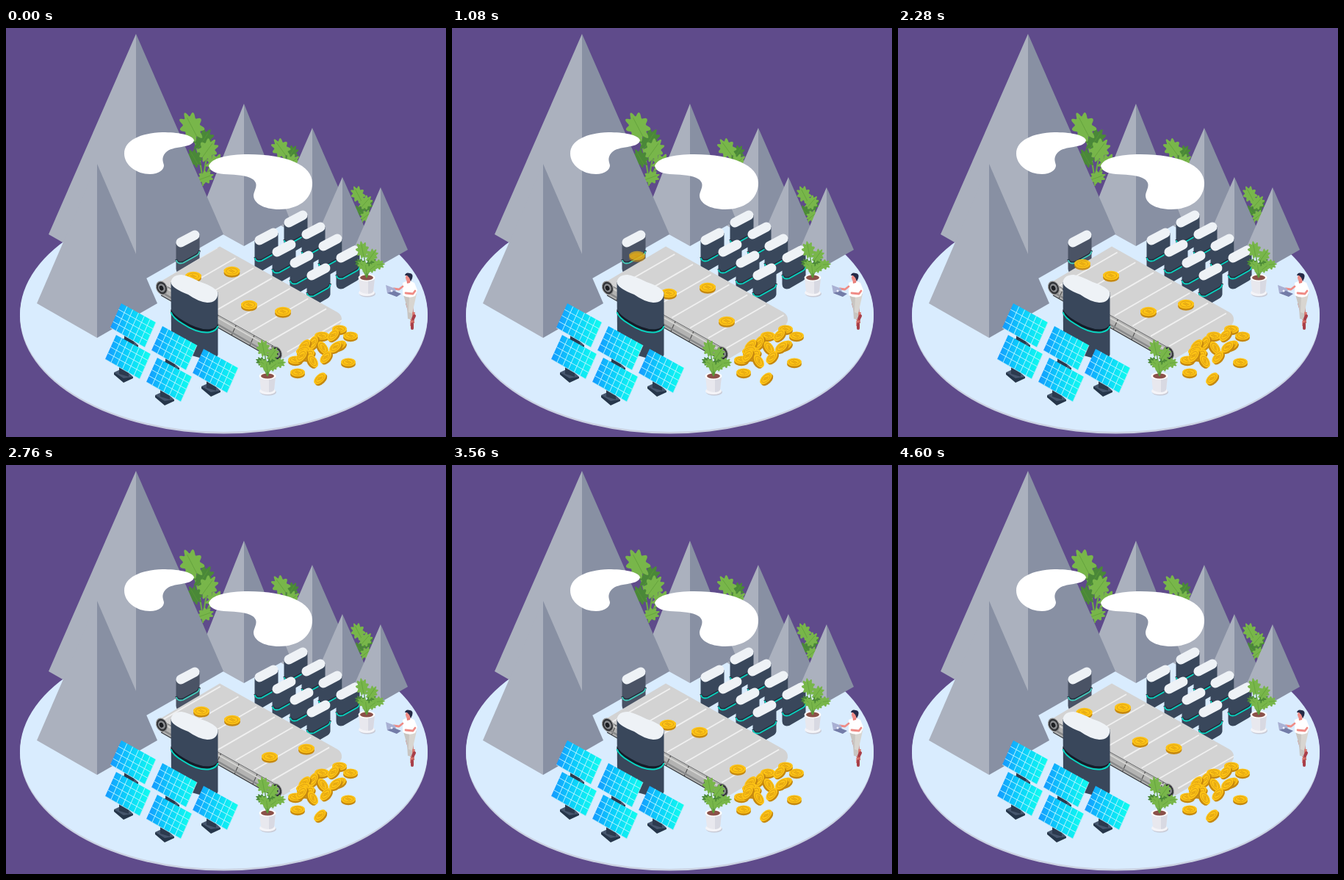
An HTML page with a canvas that plays this animation: 599x557 px, repeating every 4.64 s.

```html
<!DOCTYPE html>
<html lang="en">
<head>
<meta charset="utf-8">
<title>Coin conveyor</title>
<style>
html, body { margin: 0; width: 100%; height: 100%; overflow: hidden; background: #5f4b8b; }
canvas { display: block; }
</style>
</head>
<body>
<canvas id="stage" width="599" height="557"></canvas>
<script>
const W = 599, H = 557, LOOP = 4640;
const stage = document.getElementById('stage').getContext('2d');
let g = stage;

function layer(paint) {
  const canvas = document.createElement('canvas');
  canvas.width = W;
  canvas.height = H;
  g = canvas.getContext('2d');
  paint();
  g = stage;
  return canvas;
}

function at(x, y, paint, angle = 0) {
  g.save();
  g.translate(x, y);
  g.rotate(angle);
  paint();
  g.restore();
}

function fill(d, color) {
  g.fillStyle = color;
  g.fill(new Path2D(d));
}

function line(d, color, width = 1, cap = 'butt') {
  g.strokeStyle = color;
  g.lineWidth = width;
  g.lineCap = cap;
  g.lineJoin = 'round';
  g.stroke(new Path2D(d));
}

function oval(x, y, rx, ry, color) {
  g.fillStyle = color;
  g.beginPath();
  g.ellipse(x, y, rx, ry, 0, 0, 7);
  g.fill();
}

function mountain(x, top, half, side, bottom) {
  fill(`M${x} ${top}L${x - half} ${side}L${x} ${bottom}Z`, '#abb1be');
  fill(`M${x} ${top}L${x + half} ${side}L${x} ${bottom}Z`, '#8890a3');
}

// Lobed leaf growing from its stalk along the given angle
function leaf(x, y, size, angle, color) {
  at(x, y, () => {
    g.fillStyle = color;
    g.beginPath();
    for (let i = 0; i <= 72; i++) {
      const a = i / 72 * Math.PI * 2;
      const r = 0.84 + 0.16 * Math.cos(a * 9);
      g.lineTo(size * (0.45 + 0.55 * r * Math.cos(a)), size * 0.42 * r * Math.sin(a));
    }
    g.fill();
    line(`M0 0H${size * 0.8}`, '#5c9a38', 0.6);
  }, angle);
}

const GREEN = '#78b64a', DEEP = '#4a8838';

function coin(x, y, tilt = 0, rx = 10, ry = 5.6) {
  at(x, y, () => {
    oval(0, 1.6, rx, ry, '#c68910');
    oval(0, -1, rx, ry, '#fdc315');
    g.strokeStyle = '#dca016';
    g.lineWidth = 0.9;
    g.beginPath();
    g.ellipse(0, -1, rx * 0.7, ry * 0.66, 0, 0, 7);
    g.stroke();
    line('M-4 -2L2 1M-2 -3L4 0', '#d99b12', 1);
  }, tilt);
}

function server(x, y, body = '#39475b', ring = '#08d6c2') {
  at(x, y, () => {
    fill('M0.5 18V53Q1 61 10 59L29 48Q33 45 32.5 41V7Z', body);
    line('M0.8 40Q2 46 10 44L28 34Q32 32 32.3 28', '#222d3c', 3);
    line('M0.8 41Q2 47 10 45L28 35Q32 33 32.3 29', ring, 1.8);
    line('M7 17L26 7', '#eef2f6', 13, 'round');
  });
}

function pottedPlant(x, y) {
  at(x, y, () => {
    oval(1, 22, 11, 4.5, '#c9cbd6');
    oval(0, 20.5, 11, 4.5, '#f4f4f8');
    fill('M-11 0L-9 19Q0 25 9 19L11 0Z', '#e8e8ee');
    fill('M2 2L2 22Q7 22 9 19L11 0Z', '#d8d9e2');
    oval(0, 0, 11.5, 5, '#ffffff');
    oval(0, 0, 9, 3.5, '#8b5149');
    line('M0 0Q-1 -20 -5 -34M0 0Q5 -18 13 -22M0 0Q-5 -12 -9 -17M0 0L6 -30', '#5a9a3a', 1.4);
    leaf(3, -14, 16, -1.15, DEEP);
    leaf(-4, -28, 22, -1.75, GREEN);
    leaf(2, -23, 19, -0.95, GREEN);
    leaf(8, -17, 17, -0.1, GREEN);
    leaf(-2, -17, 15, -2.75, DEEP);
    leaf(1, -12, 16, -2.5, GREEN);
    leaf(2, -9, 15, -0.65, GREEN);
    leaf(0, -6, 14, -1.7, GREEN);
  });
}

function panel(x, y) {
  at(x, y, () => {
    fill('M-3 51L10 45L23 57L10 64Z', '#46566d');
    fill('M-3 51L10 59L23 57V59L10 65L-3 54Z', '#26364a');
    fill('M4 40L17 45V57L4 53Z', '#2c3a4e');
    const shade = g.createLinearGradient(-14, 25, 44, 32);
    shade.addColorStop(0, '#1599ff');
    shade.addColorStop(0.45, '#0bcdfb');
    shade.addColorStop(1, '#10fbef');
    fill('M0 0L47 26L32 60L-15 33Z', shade);
    let grid = '';
    for (let i = 1; i < 6; i++) grid += `M${47 * i / 6} ${26 * i / 6}l-15 33.5`;
    for (let i = 1; i < 4; i++) grid += `M${-15 * i / 4} ${33 * i / 4}l47 26.5`;
    line(grid, '#c5f6ff', 0.9);
    line('M-15 33L32 60L47 26', '#b8e8f5', 0.8);
  });
}

function man() {
  fill('M544 375L554 377L556 402L552 402Z', '#c9655f');
  fill('M541 363L555 363L554 380L553 397L547 396L546 381Z', '#c8c5c1');
  fill('M549 366L559 362L553 389L548 387Z', '#d8d5d0');
  line('M555 387L555 394M552 399L552 406', '#d9776f', 3.4);
  line('M556 392L554 396M553 403L553 409', '#a83f49', 4, 'round');
  fill('M540 347Q548 342 556 347L560 357L557 365Q549 369 540 364Z', '#ffffff');
  line('M540 352L535 356L528 355', '#ef8c86', 2.8, 'round');
  line('M557 358L554 362L544 361', '#ef8c86', 2.8, 'round');
  fill('M545 340L551 341L550 347L546 348Z', '#e87d78');
  oval(548, 340, 4, 5, '#f08d87');
  fill('M543 337Q544 332 550 334Q555 335 553 341L551 345L549 340L546 337Z', '#252b48');
  fill('M517 350L530 355L532 366L519 361Z', '#a9b0d3');
  fill('M519 361L532 366L538 362L528 358Z', '#737ca8');
  oval(525, 358, 1.5, 1.5, '#eef1ff');
}

const back = layer(() => {
  g.fillStyle = '#5f4b8b';
  g.fillRect(0, 0, W, H);
  oval(296.5, 392.5, 277.5, 160, '#cbd2e2');
  oval(296.5, 390, 277.5, 160, '#d9ecfe');

  line('M268 215Q266 175 252 140M268 212Q270 185 278 160M268 212Q274 190 290 176', '#6aa844', 2.2);
  leaf(261, 165, 32, -1, DEEP);
  leaf(261, 150, 39, -2.05, GREEN);
  leaf(266, 178, 32, -0.95, GREEN);
  leaf(262, 187, 25, -2.1, DEEP);
  leaf(275, 190, 27, -0.55, GREEN);
  leaf(262, 207, 22, -0.35, GREEN);
  leaf(383, 179, 22, -1, DEEP);
  leaf(382, 175, 29, -2.2, GREEN);
  leaf(379, 190, 25, -0.65, GREEN);
  line('M484 270Q489 245 481 226', '#6aa844', 1.7);
  leaf(487, 249, 20, -1.1, DEEP);
  leaf(484, 236, 23, -2.05, GREEN);
  leaf(483, 245, 21, -0.85, GREEN);
  leaf(486, 254, 17, -2.5, DEEP);
  leaf(484, 261, 18, -0.65, GREEN);

  mountain(417, 136, 55, 262, 294);
  mountain(324, 103, 63, 262, 297);
  mountain(458, 203, 36, 285, 306);
  mountain(510, 217, 37, 302, 323);
  mountain(177, 8, 119, 281, 349);
  mountain(124, 185, 82, 375, 422);

  fill('M256 153C254 145 233 142 213 142C183 143 161 153 161 171C161 187 178 199 196 199C208 199 215 193 215 187C214 182 211 177 217 170C227 159 253 165 256 153Z', '#fff');
  fill('M276 188C279 177 302 172 330 172C382 172 417 187 417 211C417 234 397 247 372 247C350 247 337 238 337 228C338 220 345 213 336 206C318 194 281 206 276 188Z', '#fff');

  server(378, 248);
  server(338, 272);
  server(402, 264);
  server(362, 288);
  server(425, 280);
  server(386, 303);
  server(449, 296);
  server(409, 320);
  server(231, 275, '#4a5365', '#45cdbd');
  man();
});

const BELT = new Path2D('M291 297.5L451 387Q458 391 457 399Q456 403 452 406L376 451Q377 438 366 434L209 346Z');
const SIDE = new Path2D('M212 345L368 434L367 453L212 364Z');

function roller(x, y) {
  at(x, y, () => {
    oval(0, 0, 7.5, 10, '#8f8f8f');
    oval(0, 0, 6.5, 8.5, '#303236');
    oval(0, 0, 4.7, 6, '#8b8d90');
    oval(-0.5, 0, 2.7, 3.5, '#1c1e22');
  }, -0.45);
}

function belt(t) {
  const gap = 173 / 7, shift = t / LOOP * 173 % gap;
  g.fillStyle = '#b3b3b2';
  g.fill(SIDE);
  g.save();
  g.clip(SIDE);
  let ribs = '';
  for (let x = 190 + shift; x < 390; x += gap) ribs += `M${x} ${346 + (x - 212) * 0.57}l-9 20`;
  line(ribs, '#555', 1.2);
  line('M212 351L368 440', '#d5d5d3', 2);
  line('M212 360L364 447', '#88898a', 2.5);
  g.restore();
  line('M211 364L366 452M220 352L368 435', '#34363a', 1.2);
  g.fillStyle = '#d3d3d3';
  g.fill(BELT);
  g.save();
  g.clip(BELT);
  let slats = '';
  for (let x = 266 + shift; x < 475; x += gap) {
    const y = 297.5 + (x - 291) * 0.56;
    slats += `M${x - 3} ${y + 2}L${x - 81} ${y + 47}`;
  }
  line(slats, '#f0f0f0', 1.8);
  g.restore();
  roller(212, 354);
  roller(368, 443);
}

const front = layer(() => {
  fill('M224.5 346L225 425Q226 438 242 443L267 450Q286 454 288.5 445V360Z', '#39475b');
  fill('M224.5 383Q228 391 242 399Q263 412 278 410Q286 409 288.5 403V409Q285 415 273 414Q254 411 236 400Q225 394 224.5 388Z', '#141c28');
  line('M224.5 387Q227 395 241 403Q262 417 278 414Q287 412 288.5 406', '#08d6c2', 2);
  fill('M224.5 346Q226 336 239 336Q247 337 265 346Q286 353 288.5 361Q288 374 274 374Q262 373 248 363Q224.5 354 224.5 346Z', '#eef2f6');

  for (const [x, y] of [[157, 375], [150, 418], [213, 406], [206, 449], [269, 437]]) panel(x, y);

  const pile = [
    [469, 420], [454, 411], [430, 420], [446, 419, -0.8], [419, 429, -1.1],
    [454, 433, -0.45], [449, 435, -0.7], [407, 433, -0.8], [394, 453],
    [431, 436, 0.95], [405, 440, -0.3], [412, 446, -0.6], [403, 447, -0.9],
    [436, 449, -0.85], [417, 454, 1], [466, 456], [397, 470], [428, 478, -0.75]
  ];
  for (const [x, y, tilt] of pile) coin(x, y, tilt);
  pottedPlant(356, 474);
  pottedPlant(491, 340);
});

// Each route lists time, x, y; times run on past the end of the loop
const routes = [
  [[3600, 269, 310], [4640, 307.5, 332], [5720, 348, 354], [6240, 367, 364], [6920, 392, 377], [7400, 409, 387], [7600, 418, 393], [7960, 436, 420]],
  [[4320, 244, 331], [4640, 255, 339], [5720, 295, 362], [6240, 315, 373], [6920, 341, 387], [7400, 359, 398], [8200, 389, 415], [8400, 397, 423], [8700, 403, 436]],
  [[960, 247, 305], [1080, 252, 311], [1600, 266, 324], [2280, 290, 338], [2760, 308, 348], [3560, 337, 364], [4640, 377, 387], [5100, 396, 398], [5480, 418, 428]],
  [[2100, 247, 317], [2280, 251, 322], [2760, 266, 336], [3560, 294, 354], [4640, 331, 378], [5720, 374, 400], [6080, 388, 408], [6240, 400, 417], [6540, 404, 438]]
];

const clamp = v => Math.max(0, Math.min(1, v));

function travel(route, t) {
  const start = route[0][0], end = route[route.length - 1][0];
  const now = start + ((t - start) % LOOP + LOOP) % LOOP;
  if (now >= end) return;
  const i = route.findIndex(key => key[0] > now);
  const [t0, x0, y0] = route[i - 1], [t1, x1, y1] = route[i];
  const k = (now - t0) / (t1 - t0);
  g.globalAlpha = clamp((now - start) / 200);
  const tilt = 0.85 * clamp((now - end + 460) / 160);
  coin(x0 + (x1 - x0) * k, y0 + (y1 - y0) * k, tilt, 11, 6.2);
  g.globalAlpha = 1;
}

function draw(now) {
  const t = Math.floor(now % LOOP / 40) * 40;
  g.drawImage(back, 0, 0);
  belt(t);
  for (const route of routes) travel(route, t);
  g.drawImage(front, 0, 0);
  requestAnimationFrame(draw);
}

let origin;
requestAnimationFrame(function begin(now) {
  origin = now;
  const tick = time => draw(time - origin);
  const loop = draw;
  draw = time => loop(Math.max(0, time - origin));
  tick(now);
});
</script>
</body>
</html>
```
